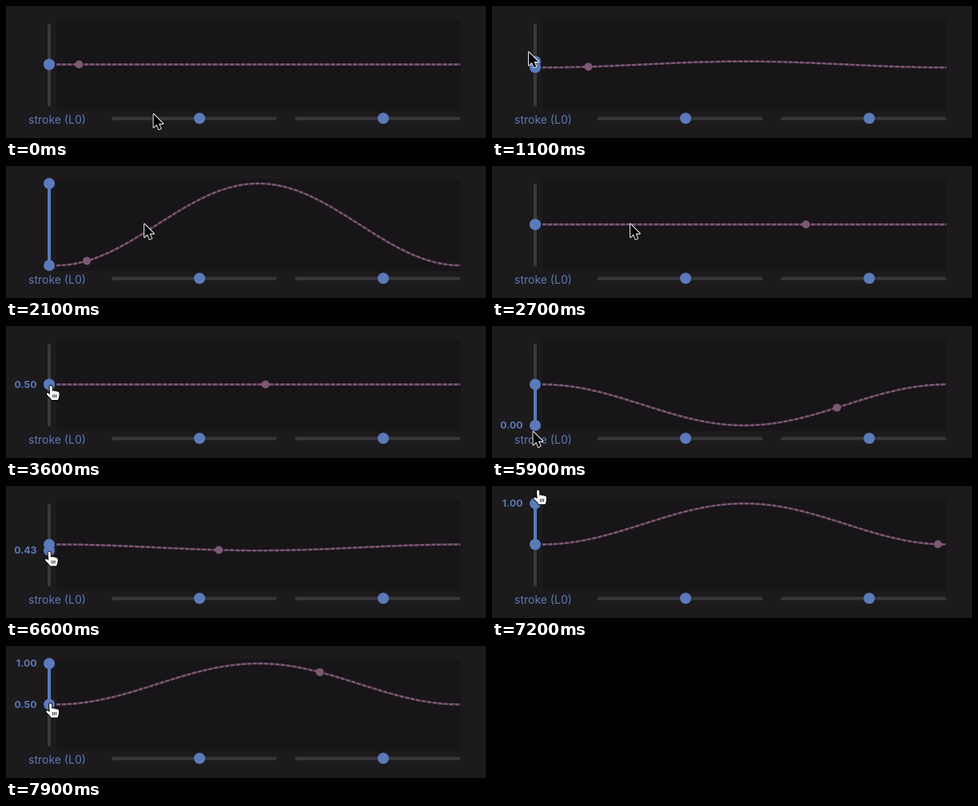
An HTML page with a canvas that plays this animation: 600x166 px, repeating every 8 s.

```html
<!DOCTYPE html>
<html>
<head>
<meta charset="utf-8">
<style>
html, body { margin: 0; width: 600px; height: 166px; overflow: hidden; background: #1c1a1c; }
canvas { display: block; }
</style>
</head>
<body>
<canvas id="stage" width="600" height="166"></canvas>
<script>
const ctx = document.getElementById('stage').getContext('2d');
const LOOP = 8000, STEP = 100, PERIOD = 1040, GLIDE = 700;
const GRAB = 3500, RELEASE = 7100;
const LEFT = 63, WIDTH = 505, SLIDER_X = 54;
const BACK = '#1c1a1c', PLOT = '#181518', TRACK = '#39383a';
const BLUE = '#5b7abb', PURPLE = '#7d5875';

// The pointer glides to each stop, arriving at the given time.
const origin = { x: 184.5, y: 136 };
const stops = [
  { at: 900, x: 46, y: 58 },
  { at: 2100, x: 173, y: 73 },
  { at: 3500, x: 55.5, y: 75 },
  { at: 4400, x: 57, y: 5 },
  { at: 5400, x: 51.5, y: 133 },
  { at: 7000, x: 57, y: 5 },
  { at: 7900, x: 55, y: 72 },
];

const arrow = new Path2D('M0 0V16.5L3.8 13L6.5 19.2L9.2 18L6.6 12H11.8Z');
const hand = new Path2D('M-1 1.6Q-1 0 .5 0T2.2 1.6V7Q4 5.6 5.4 7.2Q7 6 8.4 7.8' +
  'Q10.6 7 11 9.4V12Q11 14.5 9.4 18H1.6Q-.4 14.6 -3.6 12.2Q-5.4 10 -4 9.2Q-2.6 9 -.4 11Z');

const clamp = v => Math.min(1, Math.max(0, v));
const valueY = v => 125 - 103 * v;

function ramp(t, from, to) {
  const u = clamp((t - from) / (to - from));
  return u * u * (3 - 2 * u);
}

function pointerAt(t) {
  let { x, y } = origin;
  for (const stop of stops) {
    const k = ramp(t, stop.at - GLIDE, stop.at);
    x += (stop.x - x) * k;
    y += (stop.y - y) * k;
  }
  return { x, y };
}

// Both handles spread apart and close again, then the pointer drags one.
function handlesAt(t) {
  const spread = (ramp(t, 1000, 1600) - ramp(t, 2100, 2700)) / 2;
  const dragged = clamp((126.5 - pointerAt(Math.min(t, RELEASE)).y) / 103);
  return { start: .5 - spread, middle: t < GRAB ? .5 + spread : dragged };
}

function disc(x, y, r, color) {
  ctx.fillStyle = color;
  ctx.beginPath();
  ctx.arc(x, y, r, 0, 7);
  ctx.fill();
}

function bar(x, y, w, h, color) {
  ctx.fillStyle = color;
  ctx.fillRect(x, y, w, h);
}

function label(text, x, y, font, align) {
  ctx.font = font + ' Inter, sans-serif';
  ctx.textAlign = align;
  ctx.fillStyle = BLUE;
  ctx.fillText(text, x, y);
}

const valueLabel = v => label(v.toFixed(2), 38.5, valueY(v) + 4.2, '700 12.3px', 'right');

function drawPointer({ x, y }, isHand) {
  const shape = isHand ? hand : arrow;
  ctx.save();
  ctx.translate(x, y);
  ctx.lineJoin = 'round';
  ctx.lineWidth = 1.8;
  ctx.strokeStyle = isHand ? '#000' : '#fff';
  ctx.fillStyle = isHand ? '#fff' : '#000';
  ctx.stroke(shape);
  ctx.fill(shape);
  for (let dx = 3; isHand && dx < 8; dx += 2) bar(dx, 11, .8, 4, '#000');
  ctx.restore();
}

function drawWave(wave, phase) {
  ctx.save();
  ctx.beginPath();
  ctx.rect(LEFT - 2, 0, WIDTH + 2, 166);
  ctx.clip();
  ctx.strokeStyle = PURPLE;
  ctx.lineWidth = 2.4;
  ctx.beginPath();
  for (let x = 0; x <= WIDTH; x += 2.5) ctx.lineTo(LEFT + x, wave(x / WIDTH));
  ctx.globalAlpha = .4;
  ctx.stroke();
  ctx.globalAlpha = 1;
  ctx.setLineDash([5, 2]);
  ctx.stroke();
  disc(LEFT + phase * WIDTH, wave(phase), 5, PURPLE);
  ctx.restore();
}

function draw(t) {
  const { start, middle } = handlesAt(t);
  const wave = u => valueY(start + (middle - start) * (1 - Math.cos(2 * Math.PI * u)) / 2);

  bar(0, 0, 600, 166, BACK);
  bar(LEFT, 16, WIDTH, 116, PLOT);
  drawWave(wave, (.056 + t / PERIOD) % 1);
  label('stroke (L0)', 28, 148, '14px', 'left');

  for (const x of [132, 361.5]) {
    bar(x, 139.5, 206, 4, TRACK);
    disc(x + 110, 141.3, 7, BLUE);
  }
  bar(SLIDER_X - 2, 22.5, 4, 103.5, TRACK);
  const y0 = valueY(start), y1 = valueY(middle);
  bar(SLIDER_X - 2, y0, 4, y1 - y0, BLUE);
  disc(SLIDER_X, y0, 7, BLUE);
  disc(SLIDER_X, y1, 7, BLUE);

  if (t >= GRAB) valueLabel(middle);
  if (t >= 7700) valueLabel(start);

  const pointer = pointerAt(t);
  drawPointer(pointer, t >= GRAB && pointer.y < 130);
}

function tick() {
  const t = performance.now() % LOOP;
  draw(Math.floor(t / STEP) * STEP);
  requestAnimationFrame(tick);
}
tick();
</script>
</body>
</html>
```
